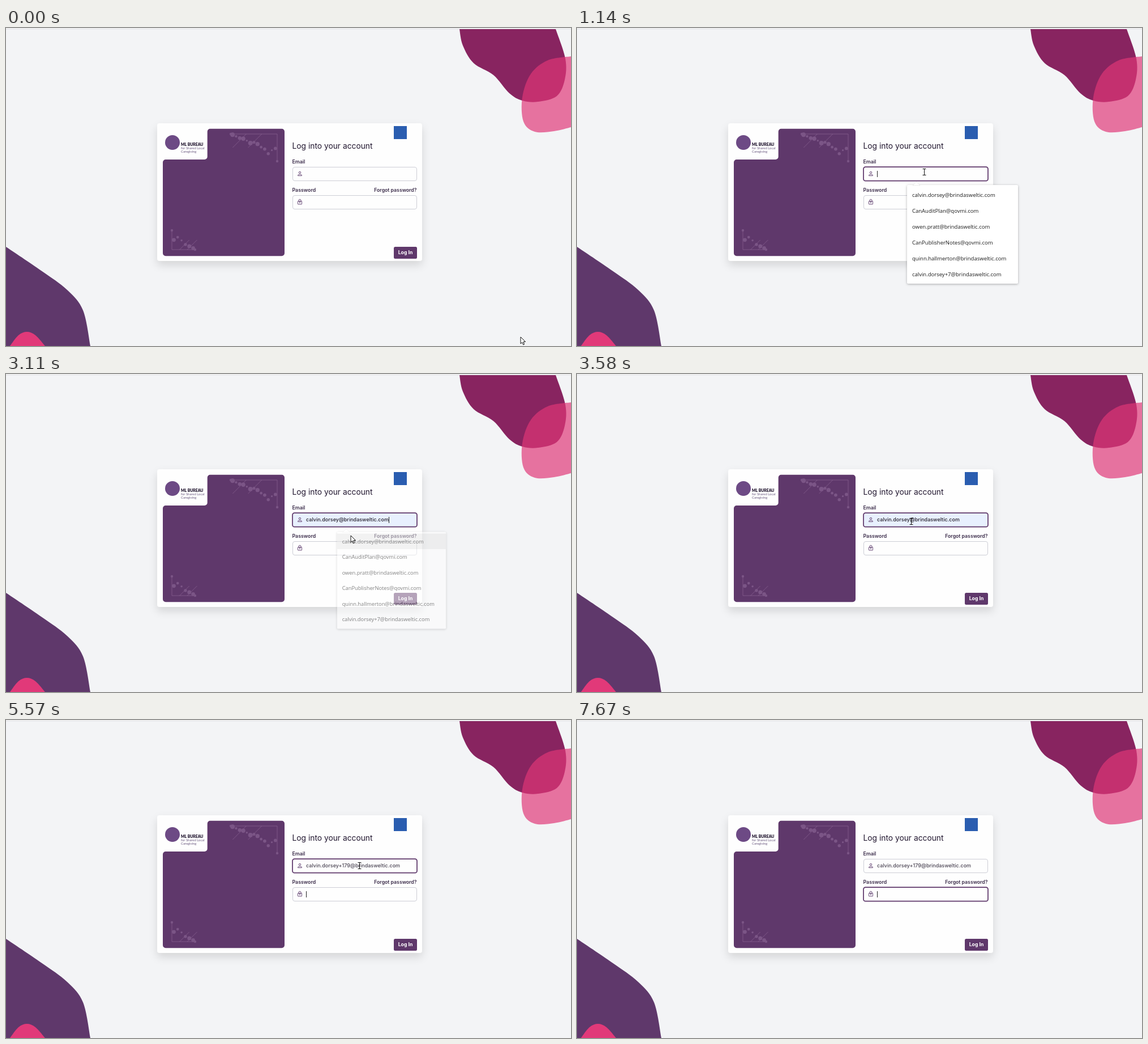
Write an HTML page with a canvas that moves like this. It is 998 px wide and 561 px high and loops after 8000 ms.

```html
<!DOCTYPE html>
<html lang="en">
<head>
<meta charset="utf-8">
<title>Log in</title>
<style>
html, body { margin: 0; width: 100%; height: 100%; overflow: hidden; background: #f3f4f6; }
canvas { display: block; width: 998px; height: 561px; }
</style>
</head>
<body>
<canvas id="stage"></canvas>
<script>
const W = 998, H = 561, LOOP = 8000, BLINK = 525;
const PURPLE = '#5f386b', INK = '#21162f', LABEL = '#3b2c4a', GREY = '#cdced6';
const UI = 'Inter, sans-serif', MENU = '"Open Sans", "Noto Sans", sans-serif';
const FIELD_FONT = '500 9px ' + UI;

const USER = 'calvin.dorsey', HOST = '@brindasweltic.com';
const OPTIONS = [
  USER + HOST, 'CanAuditPlan@qovmi.com', 'owen.pratt' + HOST,
  'CanPublisherNotes@qovmi.com', 'quinn.hallmerton' + HOST, USER + '+7' + HOST
];

// Times of the main events, in ms.
const OPEN = 1000, PRESS = 1940, PICK = 3000, PLACE = 3710, TYPE = 4640, TAB = 5570;
const KEY_GAP = 165;

const dpr = window.devicePixelRatio || 1;
const canvas = document.getElementById('stage');
const layer = document.createElement('canvas');
const [screen2d, layer2d] = [canvas, layer].map(c => {
  c.width = Math.round(W * dpr);
  c.height = Math.round(H * dpr);
  return c.getContext('2d');
});
let g = screen2d;

const ramp = (t, a, b) => Math.min(1, Math.max(0, (t - a) / (b - a)));
const ease = k => k * k * (3 - 2 * k);
const mix = (a, b, k) => a + (b - a) * k;

function random(seed) {
  return () => (seed = seed * 16807 % 2147483647) / 2147483647;
}

function text(str, x, y, font, color, align = 'left') {
  g.font = font;
  g.fillStyle = color;
  g.textAlign = align;
  g.fillText(str, x, y);
}

function box(x, y, w, h, r, fill) {
  g.beginPath();
  g.roundRect(x, y, w, h, r);
  g.fillStyle = fill;
  g.fill();
}

function frame(x, y, w, h, r, color, width) {
  g.beginPath();
  g.roundRect(x, y, w, h, r);
  g.strokeStyle = color;
  g.lineWidth = width;
  g.stroke();
}

function dot(x, y, r, fill) {
  g.beginPath();
  g.arc(x, y, r, 0, Math.PI * 2);
  g.fillStyle = fill;
  g.fill();
}

function line(x1, y1, x2, y2) {
  g.beginPath();
  g.moveTo(x1, y1);
  g.lineTo(x2, y2);
  g.stroke();
}

function poly(points, fill, stroke) {
  g.beginPath();
  points.forEach(p => g.lineTo(...p));
  g.closePath();
  g.fillStyle = fill;
  g.fill();
  g.strokeStyle = stroke;
  g.stroke();
}

function raised(color, blur, y, paint) {
  g.save();
  g.shadowColor = color;
  g.shadowBlur = blur * dpr;
  g.shadowOffsetY = y * dpr;
  paint();
  g.restore();
}

// Smooth curve through a few points, closed along the stage edge.
function blob(fill, points, corner = points[0]) {
  g.beginPath();
  g.moveTo(...points[0]);
  for (let i = 0; i < points.length - 1; i++) {
    const b = points[i], c = points[i + 1], a = points[i - 1] || b, d = points[i + 2] || c;
    g.bezierCurveTo(
      b[0] + (c[0] - a[0]) / 6, b[1] + (c[1] - a[1]) / 6,
      c[0] - (d[0] - b[0]) / 6, c[1] - (d[1] - b[1]) / 6, ...c);
  }
  g.lineTo(...corner);
  g.fillStyle = fill;
  g.fill();
}

function backdrop() {
  g.fillStyle = '#f3f4f6';
  g.fillRect(0, 0, W, H);
  blob('#882460', [[801, 2], [807, 31], [826, 62], [861, 83], [889, 115], [912, 128],
    [940, 130], [973, 120], [987, 91], [988, 54], [971, 2]]);
  blob('rgba(224,53,118,.68)', [[998, 50], [957, 57], [927, 81], [912, 122], [914, 165],
    [934, 183], [968, 182], [998, 175]]);
  blob(PURPLE, [[0, 386], [62, 428], [108, 462], [136, 498], [149, 561]], [0, 561]);
  blob('#e13979', [[7, 561], [22, 542], [37, 536], [52, 542], [69, 561]]);
  g.fillStyle = '#fdfdfd';
  g.fillRect(0, 0, W, 1);
  g.fillStyle = '#dcdde0';
  g.fillRect(0, 1, W, 1);
}

// Scattered nodes between two legs that meet at a corner.
function network(x, y, w, h, count, seed) {
  const rnd = random(seed);
  g.strokeStyle = 'rgba(170,130,175,.4)';
  g.lineWidth = 1;
  line(x, y, x + w, y);
  line(x, y, x, y + h);
  for (let i = 1; i < 3; i++) line(x + w * i / 3, y, x + w * i / 3 + h / 2 * Math.sign(w * h), y + h / 2);
  dot(x + w, y, 2.2, '#7b5586');
  dot(x, y + h, 2.2, '#7b5586');
  for (let i = 0; i < count; i++) {
    const u = (i + 0.5) / count, v = (1 - u) * (0.55 + 0.4 * rnd());
    dot(x + w * u, y + h * v, 1.5 + 3 * rnd(), '#7b5586');
  }
}

function panel() {
  const l = 277, r = 492, top = 177.7, bottom = 402.2, nx = 355.7, ny = 232;
  const corners = [[r, top], [r, bottom], [l, bottom], [l, ny], [nx, ny], [nx, top]];
  g.beginPath();
  g.moveTo(400, top);
  corners.forEach((c, i) => g.arcTo(...c, ...corners[(i + 1) % 6], 5));
  g.closePath();
  g.fillStyle = PURPLE;
  g.fill();
  network(479, 187, -82, 48, 13, 11);
  network(293, 391, 41, -34, 6, 5);
}

function card() {
  raised('rgba(0,0,0,.13)', 16, 7, () => box(267, 168, 468, 243, 4, '#fefefe'));
  panel();

  dot(294, 202, 13, '#6d4a85');
  text('ML BUREAU', 309, 208, '900 6.8px Lato, sans-serif', INK);
  text('for Shared Local', 309, 214.3, '5.9px Lato, sans-serif', '#6b5a80');
  text('Caregiving', 309, 219.5, '5.9px Lato, sans-serif', '#6b5a80');
  box(685, 173, 23, 23, 0, '#2a5db0');

  text('Log into your account', 505.5, 213, '13.8px ' + UI, INK);
  text('Email', 505.5, 238.5, '600 8.8px ' + UI, LABEL);
  text('Password', 505.5, 288.5, '600 8.8px ' + UI, LABEL);
  text('Forgot password?', 725.5, 288.5, '600 8.7px ' + UI, LABEL, 'right');
  box(685, 386, 41, 21, 2.5, PURPLE);
  text('Log In', 705.5, 399.2, '700 8.7px ' + UI, '#fff', 'center');
}

function field(y, focus, fill) {
  box(506, y, 220, 25, 4, fill);
  frame(506.5, y + 0.5, 219, 24, 3.5, GREY, 1);
  g.globalAlpha = focus;
  frame(506, y + 0.1, 220, 24.6, 3.5, PURPLE, 1.7);
  g.globalAlpha = 1;
}

function icons() {
  const tone = '#6d4f7b';
  frame(517.3, 253.3, 3.4, 3.4, 1.7, tone, 1);
  frame(515.5, 258.4, 7, 2.2, [2, 2, 0, 0], tone, 1);
  frame(517, 302.2, 4, 4, [2, 2, 0, 0], tone, 1);
  frame(515.5, 305.5, 7, 5.5, 0.5, tone, 1);
  dot(519, 308.2, 0.9, tone);
}

function form(t, hover) {
  const preview = hover && t < PICK, filled = t >= PICK;
  const tint = preview ? 1 : filled ? 1 - ramp(t, 4700, 4970) : 0;
  const swap = ramp(t, TAB, TAB + 200);
  const fill = `rgb(${mix(254, 232, tint)},${mix(254, 240, tint)},254)`;
  field(245, ramp(t, OPEN, OPEN + 130) * (1 - swap), fill);
  field(295, swap, '#fefefe');
  icons();

  const keys = Math.max(0, Math.floor((t - TYPE) / KEY_GAP) + 1);
  const name = USER + '+179'.slice(0, keys);
  if (preview) text(USER + HOST, 530, 260, '8px "Liberation Sans", Arial, sans-serif', '#111');
  if (filled) text(name + HOST, 530, 260.2, FIELD_FONT, tint > 0.5 ? '#25202c' : '#4a4453');

  // The caret blinks anew after each click or key.
  const reset = [880, PICK, PLACE, TYPE, TYPE + 3 * KEY_GAP, TAB].filter(k => k <= t).pop();
  if (t < OPEN || Math.floor((t - reset) / BLINK) % 2) return;
  g.font = FIELD_FONT;
  const before = !filled || t >= TAB ? '' : t < PLACE ? name + HOST : name;
  g.fillStyle = '#222';
  g.fillRect(Math.round(530 + g.measureText(before).width), t < TAB ? 252 : 302, 1, 11);
}

function paintMenu(hover) {
  raised('rgba(0,0,0,.3)', 4, 1, () => box(583, 277, 196, 174, 2, '#fff'));
  g.lineWidth = 0.7;
  poly([[593, 277.5], [599.5, 271.5], [606, 277.5]], '#fff', 'rgba(0,0,0,.1)');
  if (hover) box(583, 280, 196, 28, 0, '#e8e8e8');
  OPTIONS.forEach((o, i) => text(o, 592, 297.6 + 28 * i, '9.5px ' + MENU, '#1c1c1c'));
}

// Painted on its own layer so that the whole menu fades as one.
function menu(t, hover) {
  const show = t < PICK ? ramp(t, OPEN, OPEN + 130) : 1 - ramp(t, PICK, PICK + 240);
  if (!show) return;
  const scale = mix(0.96, 1, show);
  g = layer2d;
  g.setTransform(dpr, 0, 0, dpr, 0, 0);
  g.clearRect(0, 0, W, H);
  g.translate(681, 364);
  g.scale(scale, scale);
  g.translate(-681, -364);
  paintMenu(hover);
  g = screen2d;
  g.globalAlpha = show;
  g.drawImage(layer, 0, 0, W, H);
  g.globalAlpha = 1;
}

// Stops of the pointer: time, x, y.
const STOPS = [
  [70, 909, 545], [860, 611, 23], [OPEN, 613, 254], [1200, 613, 254], [1690, 626, 289],
  [PICK, 626, 289], [3110, 609, 285], [PLACE, 587, 257], [3780, 587, 257], [3910, 624, 257],
  [6800, 624, 257], [6960, 770, 334], [7140, 1010, 160]
];

function pointer(t) {
  const i = STOPS.findIndex(s => s[0] > t);
  const b = STOPS[i < 0 ? STOPS.length - 1 : i], a = STOPS[i - 1] || b;
  const k = a === b ? 0 : ease(ramp(t, a[0], b[0]));
  return [mix(a[1], b[1], k), mix(a[2], b[2], k)];
}

function cursor(x, y) {
  g.save();
  g.translate(Math.round(x), Math.round(y));
  g.lineWidth = 1;
  g.strokeStyle = '#111';
  if (x > 506 && x < 726 && y > 245 && y < 270) {
    line(-2.5, -5.5, 3.5, -5.5);
    line(-2.5, 5.5, 3.5, 5.5);
    line(0.5, -5.5, 0.5, 5.5);
  } else {
    poly([[0, 0], [0, 12], [2.8, 9.5], [4.7, 13.8], [6.6, 13], [4.8, 8.8], [8.5, 8.5]], '#fff', '#111');
  }
  g.restore();
}

function draw(t) {
  const [x, y] = pointer(t);
  const hover = t > OPEN + 130 && (t >= 1690 || y >= 280);
  g.setTransform(dpr, 0, 0, dpr, 0, 0);
  backdrop();
  card();
  form(t, hover);
  menu(t, hover);
  if (t >= PRESS && t < PICK) dot(626.5, 289, 9.3, 'rgba(243,234,40,.72)');
  cursor(x, y);
}

const start = performance.now();
function tick() {
  draw((performance.now() - start) % LOOP);
  requestAnimationFrame(tick);
}
tick();
</script>
</body>
</html>
```
